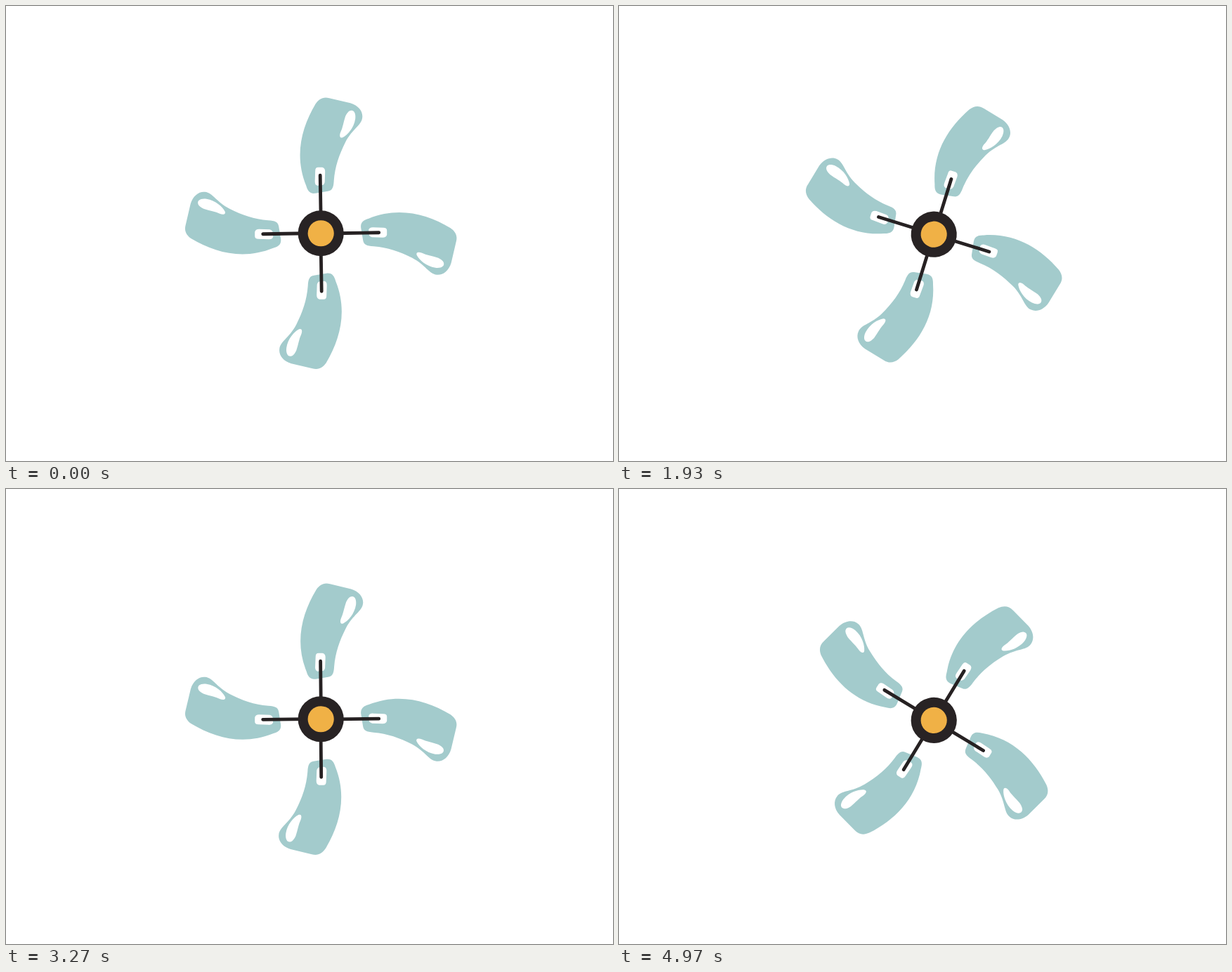
Animation of 864x648 px, one loop 5010 ms. Source, as an HTML page:

```html
<!DOCTYPE html>
<html lang="en">
<head>
<meta charset="utf-8">
<title>Propeller</title>
<style>
  html, body { margin: 0; width: 100%; height: 100%; overflow: hidden; background: #fff; }
  svg { display: block; width: 100%; height: 100%; }
</style>
</head>
<body>
<svg viewBox="0 0 864 648">
  <defs>
    <g id="blade">
      <path fill="#a3cbcc" d="M12 -192.5L42 -185.5C54 -182 60 -173 59 -165C58 -154 45 -149 35 -130
        C26 -112 20 -95 18.5 -75C18 -65 16 -61 10 -60L-8 -57C-16 -56 -19 -61 -21 -68
        C-38 -110 -28 -150 -7.5 -184.5C-3 -191 3 -195 12 -192.5Z"/>
      <path fill="#fff" d="M41 -174.5C47 -177 50 -171 49 -163C47 -150 38 -140 31 -136.5
        C27 -135 26 -139 28 -144C31 -150 32 -158 35 -167C37 -171 39 -173.5 41 -174.5Z"/>
      <path fill="#fff" d="M-8 -89Q-8 -94 -4 -94L2 -94Q6 -93 6 -88L5.5 -73Q4.5 -68 0 -68.5L-5 -68Q-9 -69 -8.5 -75Z"/>
      <path fill="none" stroke="#262122" stroke-width="4.8" stroke-linecap="round" d="M0 -20L-1 -82.5"/>
    </g>
  </defs>
  <g id="fan">
    <use href="#blade"/>
    <use href="#blade" transform="rotate(90)"/>
    <use href="#blade" transform="rotate(180)"/>
    <use href="#blade" transform="rotate(270)"/>
    <circle r="32.6" fill="#282324"/>
    <circle r="18.6" fill="#f0b146"/>
  </g>
</svg>
<script>
const LOOP = 5010, STEPS = 150, SPIN = 30;
const fan = document.getElementById('fan');

const ease = u => (1 - Math.cos(Math.PI * u)) / 2;
const glide = (x, [x0, y0], [x1, y1]) => y0 + (y1 - y0) * ease((x - x0) / (x1 - x0));

// Turning points of the slow sway on top of the steady spin: step, degrees.
const turns = [[0, 0], [29.5, 13.3], [101, -60], [182, -10]];

function angleAt(step) {
  const next = turns.findIndex(([x]) => x > step);
  return (SPIN * step + glide(step, turns[next - 1], turns[next])) % 360;
}

// The hub bobs, more gently in the middle of the loop.
function heightAt(step) {
  const calm = 1 - 0.65 * Math.sin(Math.PI * step / STEPS) ** 4;
  return 326.6 - 2.85 * calm * Math.cos(5 * Math.PI * step / STEPS);
}

function draw(ms) {
  const step = Math.min(STEPS - 1, Math.floor((ms % LOOP) * 0.03 + 0.15));
  fan.setAttribute('transform',
    `translate(448.2 ${heightAt(step).toFixed(2)}) rotate(${angleAt(step).toFixed(2)})`);
}

const start = performance.now();
function tick() {
  draw(performance.now() - start);
  requestAnimationFrame(tick);
}
tick();
</script>
</body>
</html>
```
